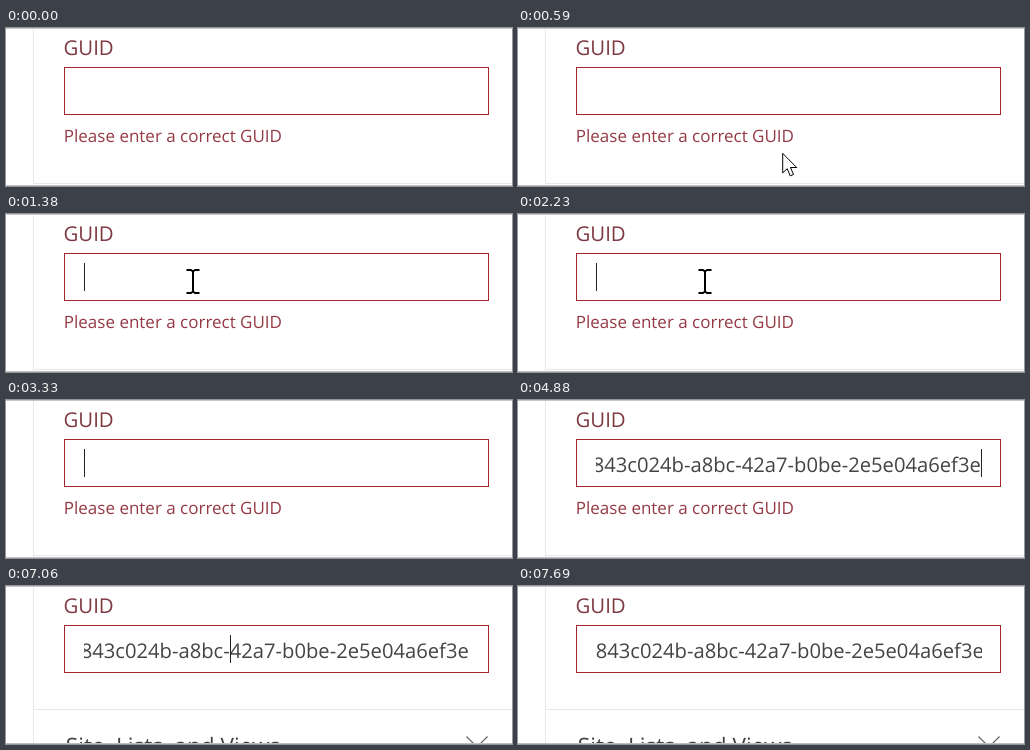
These frames come from a looping animation (506 by 158 pixels, 7.99 s). An HTML page:

```html
<!DOCTYPE html>
<html lang="en">
<head>
<meta charset="utf-8">
<title>GUID field</title>
<style>
  html, body { margin: 0; width: 100%; height: 100%; overflow: hidden; background: #fff; }
  svg { display: block; }
  text { font-family: "Open Sans", "Noto Sans", sans-serif; text-rendering: geometricPrecision; white-space: pre; }
  .off { visibility: hidden; }
</style>
</head>
<body>
<svg width="506" height="158" viewBox="0 0 506 158">
  <defs>
    <clipPath id="inner"><rect x="78" y="41" width="386" height="45"/></clipPath>
  </defs>

  <rect x="27" y="1" width="1" height="156" fill="#e8e8e8"/>
  <text x="57.5" y="27" font-size="20.4" fill="#7e3a41">GUID</text>
  <rect x="58.5" y="39.5" width="424" height="47" fill="#fff" stroke="#a4262c"/>

  <text id="error" x="57.8" y="114" font-size="17" fill="#953a45">Please enter a correct GUID</text>

  <g id="section">
    <rect x="28" y="155" width="478" height="1" fill="#e8e8e8"/>
    <text x="59.8" y="199.5" font-size="22.6" fill="#444">Site, Lists, and Views</text>
    <path d="M460.5 182.5 L471 193 L481.5 182.5" fill="none" stroke="#666" stroke-width="1.2"/>
  </g>

  <rect width="506" height="1" fill="#c6c6c6"/>
  <rect y="157" width="506" height="1" fill="#bebebe"/>

  <g clip-path="url(#inner)">
    <text id="value" y="72" font-size="20.2" fill="#444">843c024b-a8bc-42a7-b0be-2e5e04a6ef3e</text>
  </g>
  <rect id="caret" y="49" width="1" height="28" fill="#222"/>

  <circle id="press" cx="185" cy="66" r="17.5" fill="#ff0" fill-opacity=".47"/>
  <path id="beam" d="M-6.5 -11 H-2 L0 -9.5 L2 -11 H6.5 M0 -9.5 V10.5 M-6.5 12 H-2 L0 10.5 L2 12 H6.5"
        fill="none" stroke="#000" stroke-width="2"/>
  <path id="arrow" d="M.5 .5 V20 L5 15.8 L8 23 L11.3 21.6 L8.3 14.6 H14.5 Z"
        fill="#fff" stroke="#000"/>
</svg>
<script>
const LOOP = 7990, LEFT = 77.7, RIGHT = 462.8;
const $ = id => document.getElementById(id);
const [error, section, value, caret, press, beam, arrow] =
  ['error', 'section', 'value', 'caret', 'press', 'beam', 'arrow'].map($);

// [time, place]: null hides the caret, a number is the character it stands before
const END = 36;
const carets = [
  [0, null], [1230, 0], [1770, null], [2230, 0], [2780, null], [3330, 0],
  [3870, null], [4420, 0], [4880, END], [5430, null], [5980, END],
  [6440, 24], [6910, 19], [6990, 14], [7065, 9], [7140, 0], [7690, null]
];
const ENTER = 360, REST = 980, LEAVE = 2930, GONE = 3010;
const from = [333, 152], bend = [250, 130], rest = [187, 67], exit = [214, 138];
const FIELD_BOTTOM = 86;
const PASTE = 4880, VALID = 5110, HOME = 7140;

const show = (el, on) => el.classList.toggle('off', !on);
const at = (table, t) => table.filter(row => row[0] <= t).pop()[1];

function pointer(t) {
  if (t < ENTER || t >= GONE) return null;
  if (t >= LEAVE) return exit;
  const p = Math.min(1, Math.floor((t - ENTER) / (REST - ENTER) * 8) / 8);
  const e = 1 - (1 - p) ** 2;
  return [0, 1].map(i =>
    (1 - e) ** 2 * from[i] + 2 * e * (1 - e) * bend[i] + e * e * rest[i]);
}

function drawPointer(t) {
  const pos = pointer(t);
  const inField = pos && pos[1] < FIELD_BOTTOM;
  show(beam, inField);
  show(arrow, pos && !inField);
  if (pos) (inField ? beam : arrow).setAttribute('transform', `translate(${pos})`);
  show(press, t >= 1150 && t < 1380);
}

function drawField(t) {
  const width = value.getComputedTextLength();
  const start = t >= PASTE && t < HOME ? RIGHT - width : LEFT;
  value.setAttribute('x', start);
  show(value, t >= PASTE);

  const place = at(carets, t);
  show(caret, place !== null);
  if (place !== null) {
    const x = start + (place ? value.getSubStringLength(0, place) : 0);
    caret.setAttribute('x', Math.floor(x + 0.4));
  }
}

function draw(t) {
  drawPointer(t);
  drawField(t);
  show(error, t < VALID);
  section.setAttribute('transform', `translate(0 ${t < VALID ? 0 : -32})`);
}

const begin = performance.now();
function tick() {
  draw((performance.now() - begin) % LOOP);
  requestAnimationFrame(tick);
}
tick();
</script>
</body>
</html>
```
